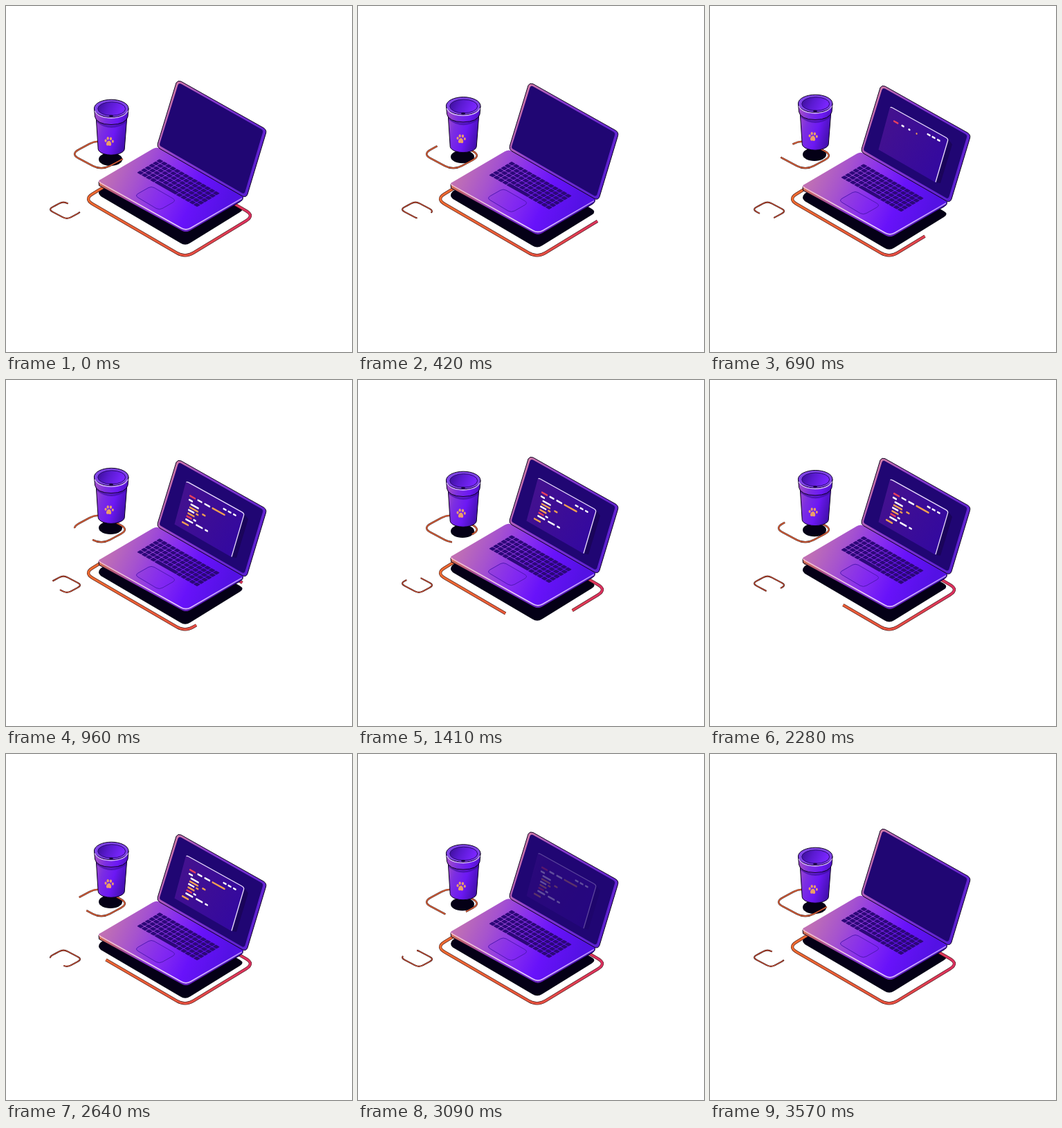
An HTML page that plays this animation: 500 by 500 pixels, repeating every 3630 ms.

```html
<!DOCTYPE html>
<html lang="en">
<head>
<meta charset="utf-8">
<title>Laptop and cup</title>
<style>
  html, body { margin: 0; width: 100%; height: 100%; overflow: hidden; background: #fff; }
  svg { display: block; width: 500px; height: 500px; }
</style>
</head>
<body>
<svg viewBox="0 0 500 500" xmlns="http://www.w3.org/2000/svg">
  <defs>
    <linearGradient id="deck" gradientUnits="userSpaceOnUse" x1="150" y1="232" x2="312" y2="306">
      <stop offset="0" stop-color="#c070b4"/>
      <stop offset=".25" stop-color="#a552cf"/>
      <stop offset=".5" stop-color="#862cf0"/>
      <stop offset=".72" stop-color="#6812fa"/>
      <stop offset="1" stop-color="#5411e4"/>
    </linearGradient>
    <linearGradient id="lid" gradientUnits="userSpaceOnUse" x1="225" y1="150" x2="372" y2="230">
      <stop offset="0" stop-color="#d07aa8"/>
      <stop offset=".3" stop-color="#8a3cd0"/>
      <stop offset="1" stop-color="#5a1fd0"/>
    </linearGradient>
    <linearGradient id="edge" gradientUnits="userSpaceOnUse" x1="134" y1="0" x2="343" y2="0">
      <stop offset="0" stop-color="#f3b9c8"/>
      <stop offset=".5" stop-color="#e6ccff"/>
      <stop offset="1" stop-color="#b58cff"/>
    </linearGradient>
    <linearGradient id="side" gradientUnits="userSpaceOnUse" x1="134" y1="0" x2="343" y2="0">
      <stop offset="0" stop-color="#d2704f"/>
      <stop offset=".3" stop-color="#8a35d0"/>
      <stop offset="1" stop-color="#3c0bb0"/>
    </linearGradient>
    <linearGradient id="pane" gradientUnits="userSpaceOnUse" x1="250" y1="165" x2="335" y2="220">
      <stop offset="0" stop-color="#43118f"/>
      <stop offset="1" stop-color="#34099f"/>
    </linearGradient>
    <linearGradient id="body" gradientUnits="userSpaceOnUse" x1="129" y1="172" x2="176" y2="186">
      <stop offset="0" stop-color="#9a48cc"/>
      <stop offset=".25" stop-color="#7c2ee2"/>
      <stop offset=".6" stop-color="#6c18f4"/>
      <stop offset="1" stop-color="#4210ac"/>
    </linearGradient>
    <linearGradient id="hole" x1="0" y1="0" x2="1" y2=".25">
      <stop offset="0" stop-color="#3a0e94"/>
      <stop offset=".45" stop-color="#5a1ad0"/>
      <stop offset="1" stop-color="#7a26ff"/>
    </linearGradient>
    <linearGradient id="trace" gradientUnits="userSpaceOnUse" x1="118" y1="0" x2="354" y2="0">
      <stop offset="0" stop-color="#ec6a30"/>
      <stop offset=".55" stop-color="#e8553c"/>
      <stop offset="1" stop-color="#dc3060"/>
    </linearGradient>
  </defs>

  <path data-float="8" fill="#040016" d="M137 264 L216 217 L338 289.500 Q345 293.500 338 298 L266 342.500 Q259 347 252 342.500 L137 275 Q131 270 137 264Z"/>
  <ellipse data-float="-8" cx="151" cy="221.500" rx="17" ry="9.500" fill="#040016"/>

  <g id="lines" fill="none"></g>

  <g data-float="-8">
    <path d="M130 158 L133.200 207 Q134 211 141 213.600 Q152 217 163 213.600 Q170.500 211 171.200 207 L175 158Z" fill="url(#body)" stroke="#0c0020"/>
    <path d="M130.500 164 Q152 182 174.500 164 L174.200 168 Q152 184 131 168Z" fill="#3a0c98" opacity=".6"/>
    <path d="M127.500 148 L128.500 160 Q131 171 152 171.500 Q173 171 176 160 L177 148Z" fill="url(#body)" stroke="#0c0020"/>
    <ellipse cx="152.200" cy="148" rx="24.800" ry="12.800" fill="#8044e6" stroke="#0c0020"/>
    <path d="M128.300 151.500 Q133 161.500 152 162 Q171 161.500 176.200 151.500" fill="none" stroke="#d3b6ff" stroke-width="1.400"/>
    <ellipse cx="152.700" cy="148.500" rx="20" ry="9.800" fill="url(#hole)" stroke="#2a0a74"/>
    <ellipse cx="152" cy="158.800" rx="3" ry="1.300" fill="#16033f"/>
    <g fill="#eb9f69" transform="translate(149 196) scale(.9) translate(-150 -196)">
      <path d="M150 194.500 C153.500 194.500 155 203 151.500 202.600 Q149.500 201.800 147.500 202.300 C143.500 202 146 194.500 150 194.500Z"/>
      <ellipse cx="144.500" cy="194.500" rx="1.700" ry="2.300"/>
      <ellipse cx="148" cy="190.800" rx="1.800" ry="2.500"/>
      <ellipse cx="152.700" cy="191.200" rx="1.800" ry="2.500"/>
      <ellipse cx="155.900" cy="195.600" rx="1.600" ry="2.300"/>
    </g>
  </g>

  <g data-float="8">
    <path d="M134 254 L134.500 259.500 L254 325 Q260 328.500 266 325 L339 282.500 Q343 280 342.500 276Z" fill="url(#side)" stroke="#0c0020"/>
    <path d="M137 250.500 L212 206.500 Q218 203 224 206.500 L340 272.500 Q345 276 340 279 L267 320.800 Q260 324.800 253 320.800 L137 256 Q131 253 137 250.500Z" fill="url(#deck)"/>
    <path d="M134.500 254 L137 256 L253 320.800 Q260 324.800 267 320.800 L341 278" fill="none" stroke="url(#edge)" stroke-width="1.700"/>
    <g id="keys" transform="matrix(.626 .357 -.558 .335 222 220.700)" fill="#2c0878"></g>
    <path d="M191 271 L206 262.500 Q210 260.500 214 262.500 L241 278 Q246 281 241 284 L226 292.500 Q221.500 295 217 292.500 L191 277 Q186 274 191 271Z" fill="#7a22ee" fill-opacity=".25" stroke="#5018b4"/>
    <path d="M246 111 Q248.500 107 253 109 L372 176 Q377 179 375.500 184 L349 272 Q347 277 342 275 L222 206 Q218 203.500 219.200 199Z" fill="url(#lid)" stroke="#0c0020"/>
    <path d="M248.500 114 Q250 110.800 253 112.500 L369 178 Q372 180 371 183 L345.500 268.500 Q344.300 272 341 270.300 L224 203 Q221.500 201.500 222.300 198.500Z" fill="#200673"/>
    <g id="app">
      <path d="M344 185 L350 193 L333 249 L326 248Z" fill="#170350" opacity=".7"/>
      <path d="M259.500 141 Q260.500 138 263.500 140 L341 183 Q344.500 185 343.500 188 L326 248 L243.500 200.500Z" fill="url(#pane)"/>
      <path d="M260.500 139.700 Q262 139 263.500 140 L341 183 Q344.500 185 343.500 188 L326 247.500" fill="none" stroke="#eadcff" stroke-width="1.300"/>
      <g id="code" transform="matrix(1 .554 -.29 1 261 139)"></g>
    </g>
  </g>
</svg>
<script>
const LOOP = 3630, SPAN = 3570, STEP = 30;
const $ = id => document.getElementById(id);

function add(parent, tag, attrs) {
  const el = document.createElementNS("http://www.w3.org/2000/svg", tag);
  for (const k in attrs) el.setAttribute(k, attrs[k]);
  return parent.appendChild(el);
}

// Closed polygon with soft corners, starting halfway along its last edge.
function softPath(pts, trim) {
  const n = pts.length;
  const toward = (p, q) => {
    const k = trim / Math.hypot(q[0] - p[0], q[1] - p[1]);
    return [p[0] + (q[0] - p[0]) * k, p[1] + (q[1] - p[1]) * k];
  };
  const last = pts[n - 1];
  let d = `M${(last[0] + pts[0][0]) / 2} ${(last[1] + pts[0][1]) / 2}`;
  pts.forEach((p, i) => {
    d += `L${toward(p, pts[(i + n - 1) % n])}Q${p} ${toward(p, pts[(i + 1) % n])}`;
  });
  return d + "Z";
}

// start and gap are percentages of the outline; laps are per loop.
const lines = [
  { pts: [[359, 303], [259, 364], [113, 279], [213, 218]], trim: 14, width: 3.2, color: "url(#trace)", start: 4.8, gap: 20, laps: 1 },
  { pts: [[178, 216], [133, 192.5], [93, 214], [138, 237.5]], trim: 14, width: 1.4, color: "#e8683a", start: 25.5, gap: 18.5, laps: 2 },
  { pts: [[83, 282], [110, 296.5], [88, 308.5], [61, 294]], trim: 7, width: 1, color: "#e25a36", start: 41, gap: 22, laps: 2 }
];
for (const l of lines) {
  const base = {
    d: softPath(l.pts, l.trim), pathLength: 100,
    "stroke-dasharray": `${100 - l.gap} ${l.gap}`
  };
  l.paths = [[l.width + 1.1, "#3c0f10"], [l.width, l.color]].map(([w, c]) =>
    add($("lines"), "path", { ...base, stroke: c, "stroke-width": w }));
}

for (let row = 0; row < 6; row++) {
  for (let col = 0; col < 14; col++) {
    const space = row === 5 && col >= 4 && col <= 8;
    if (space && col > 4) continue;
    add($("keys"), "rect", { x: col * 10 + .6, y: row * 10 + .7, width: space ? 48.8 : 8.8, height: 8.6, rx: 1.4 });
  }
}

const W = "#fff", O = "#f0a050", R = "#e8405c";
// x, y, width, color
const marks = [
  [55, 8, 5, W], [62, 8, 5, W], [69.5, 8, 4.5, W],
  [8.5, 15, 9, R], [20, 15, 7, W], [30, 15, 8.5, W], [41, 15, 19, O],
  [9, 20.5, 6, W],
  [13, 25, 12, W],
  [12.5, 29.5, 13, O], [31, 29.5, 5, O],
  [12, 33.5, 9, W], [23, 33.5, 4, O],
  [12.5, 38, 10, O],
  [12, 42.5, 8, R], [22, 42.5, 4, W],
  [12, 47, 11, W], [27, 47, 10, W], [40, 47, 4.5, W],
  [8.5, 53, 10, O]
];
const bars = marks.map(([x, y, width, fill]) =>
  add($("code"), "rect", { x, y: y - 1, width, height: 2.4, rx: .8, fill }));

const floaters = [...document.querySelectorAll("[data-float]")];
const ramp = (t, a, b) => Math.max(0, Math.min(1, (t - a) / (b - a)));

function draw(t) {
  const p = t / SPAN;
  const lift = (1 - Math.cos(p * 4 * Math.PI)) / 2;
  for (const el of floaters) {
    el.setAttribute("transform", `translate(0 ${(el.dataset.float * lift).toFixed(2)})`);
  }
  for (const l of lines) {
    const offset = -((l.start + 100 * l.laps * p) % 100);
    for (const path of l.paths) path.setAttribute("stroke-dashoffset", offset);
  }
  $("app").setAttribute("opacity", ramp(t, 480, 660) * (1 - ramp(t, 2940, 3150)));
  bars.forEach((bar, i) => {
    const start = 600 + i * 14;
    bar.setAttribute("width", marks[i][2] * ramp(t, start, start + 60));
  });
}

const t0 = performance.now();
function tick() {
  const t = (performance.now() - t0) % LOOP;
  draw(Math.min(SPAN, Math.floor(t / STEP) * STEP));
  requestAnimationFrame(tick);
}
tick();
</script>
</body>
</html>
```
